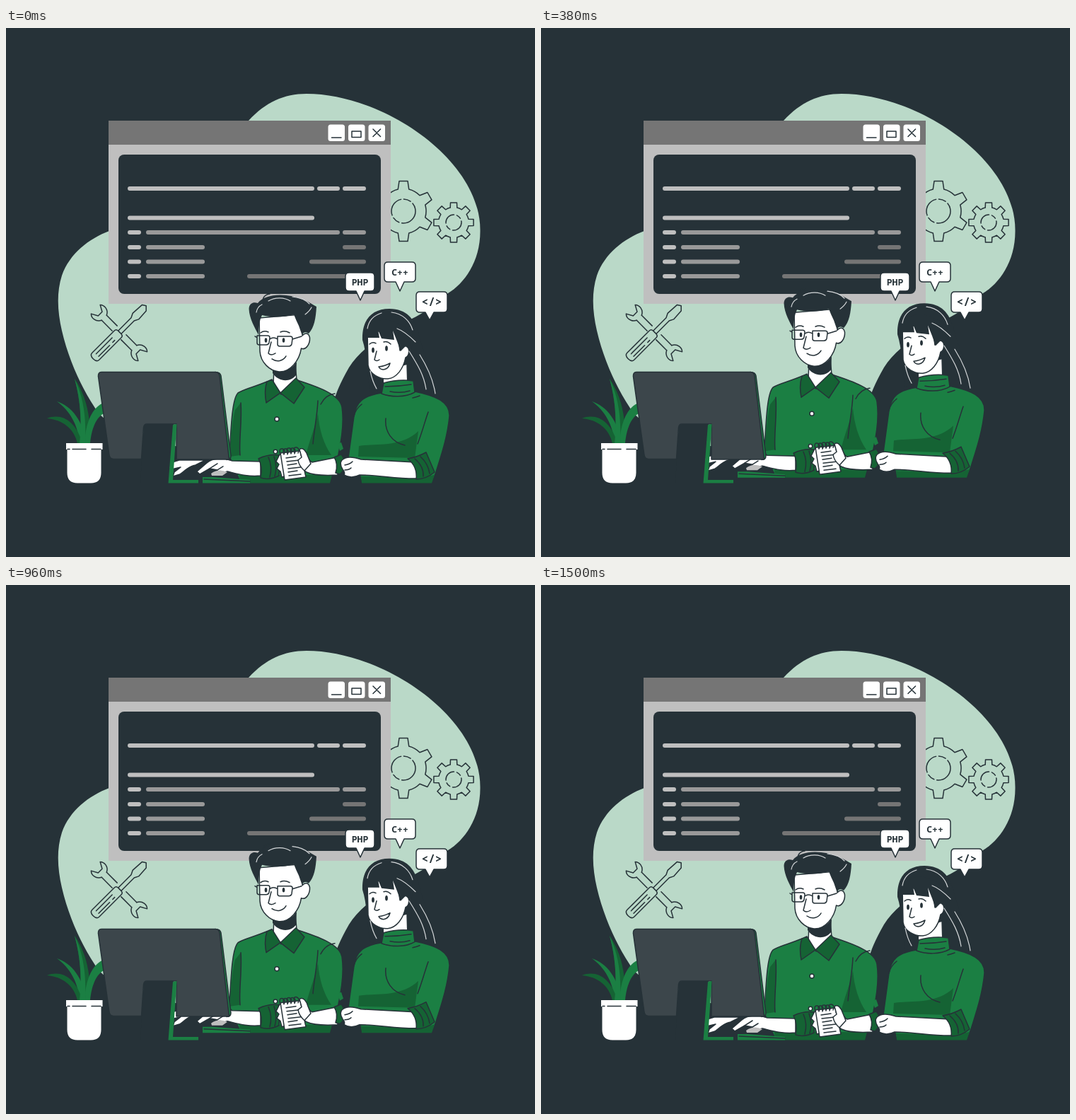
Write an HTML page that moves like this. It is 748x748 px and loops after 1540 ms.

```html
<!DOCTYPE html>
<html lang="en">
<head>
<meta charset="utf-8">
<title>Pair programming</title>
<style>
html, body { margin: 0; width: 100%; height: 100%; overflow: hidden; background: #263238; }
svg { display: block; width: 100vw; height: 100vh; }
.o { stroke: #263238; stroke-width: 1.5; stroke-linejoin: round; stroke-linecap: round; }
.l { fill: none; stroke: #263238; stroke-width: 1.5; stroke-linejoin: round; stroke-linecap: round; }
.h { fill: none; stroke: #d5d8da; stroke-width: 1.2; stroke-linecap: round; }
.w { fill: #fff; }
.g { fill: #1b7f43; }
.d { fill: #156334; }
.k { fill: #263238; }
.tag { font: 700 13px "Noto Sans Mono", "DejaVu Sans Mono", monospace; text-anchor: middle; fill: #263238; }
</style>
</head>
<body>
<svg viewBox="0 0 748 748">
  <rect width="748" height="748" class="k"/>
  <path fill="#bad9c8" d="M343 131C367 105 393 93 425 93C533 93 671 186 670.500 286C671 330 648 361 625 375C610 390 591 403 572 412C530 435 500 455 485 480C476 496 470 508 466 520L440 560C380 610 200 610 132 546C111 517 90 475 79 428C73 402 71 375 79 350C90 319 117 298 146 287L250 220Z"/>
  <g id="gears" class="l"></g>

  <g class="l">
    <g transform="translate(160 431) rotate(45)">
      <path d="M-30 -5H-9M9 -5H30M-30 5H-9M9 5H30"/>
      <path id="jaw" d="M30 -5C34 -13 43 -13 47 -9L38 -4V4L47 9C43 13 34 13 30 5"/>
      <use href="#jaw" transform="scale(-1 1)"/>
    </g>
    <g transform="translate(160 431) rotate(-45)">
      <path fill="#bad9c8" d="M1 -3H27L33 -6L51 -5L54 0L49 5L33 6L27 3H1Z"/>
      <path fill="#bad9c8" d="M-47 -7H-3Q1 -7 1 -3V3Q1 7 -3 7H-47Q-52 7 -52 0Q-52 -7 -47 -7ZM-44 -2H-12M-44 3H-22M-16 3H-12"/>
    </g>
  </g>

  <rect x="145" y="131" width="399" height="259" fill="#bfbfbf"/>
  <rect x="145" y="131" width="399" height="34" fill="#757575"/>
  <rect x="159" y="179" width="371" height="197" rx="8" class="k"/>
  <g class="w">
    <rect x="455.500" y="136.500" width="23.500" height="23.500" rx="3.500"/>
    <rect x="484" y="136.500" width="23.500" height="23.500" rx="3.500"/>
    <rect x="512.500" y="136.500" width="23.500" height="23.500" rx="3.500"/>
  </g>
  <path class="l" d="M460.500 155H474M489 146H502V154.500H489ZM519 143L529.500 153.500M529.500 143L519 153.500"/>
  <g id="code" stroke-width="6" stroke-linecap="round"></g>

  <g class="d">
    <path d="M97 496C113 519 121 551 118 587H104C108 552 104 522 97 496Z"/>
    <path d="M72 528C93 535 109 555 113 587H104C102 561 90 541 72 528Z" class="g"/>
    <path d="M58 552C79 544 99 556 108 587H101C96 566 80 554 58 552Z"/>
    <path d="M140 529C121 536 113 558 111 587H119C121 567 127 550 140 544Z" class="g"/>
    <path d="M97 496C108 518 114 548 112 587H104C108 552 104 522 97 496Z" class="g"/>
  </g>
  <path class="w" d="M85 587H136.500V596H134.500V629Q134.500 643.500 120 643.500H101Q86.500 643.500 86.500 629V596H85Z"/>
  <path class="l" d="M87 595.500H90M94 595.500H113M121 595.500H134"/>

  <g id="people">
    <!-- man -->
    <path class="g o" d="M369 500C350 508 335 511 328 516C319 525 318 570 316 606L332 643.500H458L470 603C475 580 478 556 475 536C472 518 440 507 412 498Z"/>
    <path class="d" d="M332 530C334 556 329 585 331 604L317 606C318 580 320 555 324 540ZM441 545C438 562 430 580 424 604H460C449 588 443 568 441 545ZM330 632H461L458 643.500H331Z"/>
    <path class="l" d="M332 530C334 556 329 585 331 604M441 527C440 549 436 566 434 588M445 532C449 524 456 518 465 517"/>
    <path class="w o" d="M379 480L378 503L389 518L411 498L409 474Z"/>
    <path class="k" d="M377 482C385 488 402 486 411 472L410 491C401 502 385 500 377 488Z"/>
    <path class="d o" d="M376 497L388 516L368 530C366 520 366 509 369 500ZM410 495L422 508L407 531L388 516Z"/>
    <circle cx="383" cy="553" r="3" class="w o"/>
    <circle cx="381" cy="599" r="2.700" class="w o"/>
    <path class="w o" d="M358 410L359 457C360 473 373 485 386 486C402 487 415 470 417.500 453C424 456 430 447 429.500 438C428 430 422 431 419 435L417 405Z"/>
    <path class="k" d="M357 434C352 424 344 411 343.500 397C344 389 350 387 356 389C363 380 379 376 396 378C416 380 429 388 439 394C438 411 436 423 428 432C424 429 420 430 418.500 434L414 421Q410 413 407 405C392 410 373 409 362 406Q357 416 357 434Z"/>
    <path class="l" d="M365 390C361 383 365 377 373 376"/>
    <path class="h" d="M371 386C381 380 394 381 402 386M405 380C416 381 424 385 429 390M354 402C355 396 358 393 362 391M423 405C427 402 430 399 432 395"/>
    <path class="l" d="M355 435H370Q373 435 373 438L372 445Q371 448 368 448H358Q355 448 355 445ZM384 436H402Q405 436 405 439L404 447Q403 450 400 450H387Q384 450 384 447ZM373 440Q378 436 384 440M405 440L418 436M355 438L352 436M360 431Q365 427 371 430M388 430Q394 427 401 431M375 444L371 460Q375 464 381 460M376 468C383 473 392 471 396 464"/>
    <ellipse cx="367.500" cy="441.500" rx="1.800" ry="3.200" class="k"/>
    <ellipse cx="392.500" cy="441.500" rx="1.800" ry="3.200" class="k"/>

    <path class="g" d="M278 635H292L345 639V643.500H278Z"/>
    <path class="l" d="M280 638L345 641"/>
    <path class="w o" d="M222 618L245 611H282L268 618C259 619 253 626 246 631L236 634L238 628L247 621L234 624Z"/>
    <path class="w o" d="M270 627L284 615C292 608 306 607 320 612L360 613V633C342 635 326 630 313 627L295 632L299 625L288 623L274 631Z"/>
    <path fill="#bfbfbf" d="M290 630Q300 622 313 628L306 633H291Z"/>
    <path class="l" d="M288 623L299 616M299 625L307 620"/>
    <path class="d o" d="M357 609Q371 602 387 604L386 633Q372 640 360 636Q363 620 357 609Z"/>
    <path class="l" d="M371 607Q377 620 373 635M379 606Q384 620 380 634"/>

    <path class="w o" d="M420 602C428 600 426 612 433 614L468 607L469 632C452 633 436 633 425 628L412 620Z"/>
    <path class="w o" d="M387 603L382 613L386 617L383 623L388 627L390 635L397 633V603Z"/>
    <path class="w o" d="M388 601L416 598L424 635L394 639Z"/>
    <path class="l" d="M396 608L410 606M397 613L415 611M398 618L411 616M399 623L417 621M399 628L412 626M400 633L417 631"/>
    <path class="l" d="M388 603q-3 -9 3 -8q5 2 2 8m0 0q-3 -9 3 -8q5 2 2 8m0 -1q-3 -9 3 -8q5 2 2 8m0 0q-3 -9 3 -8q5 2 2 8m0 -1q-3 -9 3 -8q5 2 2 8"/>
    <path class="w o" d="M415 596C420 592 425 599 427 606L431 616L422 626Q414 619 413 611L418 607Z"/>
    <path class="d o" d="M464 607L474 603C481 611 480 625 472 631L466 629Q470 617 464 607Z"/>
    <path class="g" d="M469 588L474 586L477 595L472 598Z"/>

    <!-- woman -->
    <path class="k" d="M504 441C503 413 517 397 542 397C567 397 577 412 583 430C586 450 604 483 607 518L571 525L515 515C510 490 511 462 504 441Z"/>
    <path class="w" d="M534 485V507H567V476Z"/>
    <path class="w o" d="M511 430L512 477C514 490 529 497 540 496C552 495 562 482 565 466C570 464 572 453 566 450C561 449 558 453 557 456L553 427Z"/>
    <path class="k" d="M505 442C505 425 516 412 540 412L575 426L574 451C568 446 561 449 558 457L553 443L547 428L549 441L531 439L526 427L528 438L511 438L509 451Z"/>
    <path class="k" d="M555 432L571 442C577 460 575 482 567 500L566 467Q574 455 566 449L558 457Z"/>
    <path class="h" d="M511 425C513 413 521 406 531 403M545 402C561 404 571 414 575 427M553 425Q564 429 579 444M570 457C582 476 591 491 594 511M585 462C597 481 604 497 607 517M515 485Q518 500 524 510"/>
    <path class="l" d="M514 447Q518 443 523 446M534 444Q539 442 544 447M524 457L521 469Q524 472 528 469"/>
    <ellipse cx="519" cy="455.500" rx="1.900" ry="3.800" class="k"/>
    <ellipse cx="538" cy="453" rx="1.900" ry="3.800" class="k"/>
    <path class="w o" d="M527 479Q536 478 543 474Q541 482 534 483Q529 483 527 479Z"/>

    <path class="g o" d="M531 516C505 520 495 529 492 549L484 608L501 634L503 643.500H602L608 628C615 605 624 580 627 549C628 529 608 520 578 514Z"/>
    <path class="d" d="M499 591C520 587 558 594 583 570L578 608L498 606ZM502 634L580 636L606 632L602 643.500H503Z"/>
    <path class="g o" d="M534 502C548 498 562 497 576 499L578 515C564 523 544 522 531 517Z"/>
    <path class="l" d="M536 507Q555 507 573 504M543 514Q558 517 571 513M492 549Q494 539 503 532M537 552C535 571 546 586 564 590M597 543C592 557 588 573 582 588M575 523Q580 522 585 520"/>
    <path class="w o" d="M475 611C481 605 493 607 502 610L578 614L583 637C555 638 526 632 500 632Q488 638 478 632Q480 628 476 624Q471 616 475 611Z"/>
    <path class="l" d="M479 618Q486 617 490 613M479 625Q485 625 488 622"/>
    <path class="d o" d="M568 609Q581 607 594 600L606 628Q594 638 580 638Q582 620 568 609Z"/>
    <path class="l" d="M578 609Q591 620 590 634M586 606Q597 616 599 630"/>
  </g>

  <path class="g o" d="M296 486.500Q303 486.500 304 492L318 605Q318 610.500 312 610.500Z"/>
  <path fill="#3c464b" class="o" d="M135 486.500H296Q301 486.500 302 492L315.500 610H241V560H199Q195 560 194.500 565L191.500 609.500H152Q147 609.500 146 604L130.500 493Q130 486.500 135 486.500Z"/>
  <path class="k" d="M199 560H237L230 643.500H190L194.500 565Q195 560 199 560Z"/>
  <path class="g" d="M236 561L241.500 560L236 639H272V643.500H229.500Z"/>

  <g class="w o">
    <path d="M485 346H516Q521 346 521 351V367Q521 372 516 372H507L501 385L495 372H485Q480 372 480 367V351Q480 346 485 346Z"/>
    <path d="M540 331H574Q579 331 579 336V354Q579 359 574 359H563L557 372L551 359H540Q535 359 535 354V336Q535 331 540 331Z"/>
    <path d="M585 373H619Q624 373 624 378V397Q624 402 619 402H605L599 413L593 402H585Q580 402 580 397V378Q580 373 585 373Z"/>
  </g>
  <text class="tag" x="500.500" y="364">PHP</text>
  <text class="tag" x="557" y="349.500">C++</text>
  <text class="tag" x="602" y="393" style="font-size:16px">&lt;/&gt;</text>
</svg>
<script>
const $ = id => document.getElementById(id);

// rows of bars: y, colour, then start/end pairs
const bars = [
  [227, '#bfbfbf', 172, 436, 440, 472, 476, 509],
  [268.5, '#bfbfbf', 172, 436],
  [289, '#bfbfbf', 172, 191], [289, '#999', 198, 472, 476, 509],
  [310, '#bfbfbf', 172, 191], [310, '#999', 198, 281], [310, '#757575', 476, 509],
  [330.5, '#bfbfbf', 172, 191], [330.5, '#999', 198, 281], [330.5, '#757575', 429, 509],
  [351, '#bfbfbf', 172, 191], [351, '#999', 198, 281], [351, '#757575', 341, 509]
];
$('code').innerHTML = bars.map(([y, color, ...x]) => {
  let d = '';
  for (let i = 0; i < x.length; i += 2) d += `M${x[i] + 3} ${y}H${x[i + 1] - 3}`;
  return `<path stroke="${color}" d="${d}"/>`;
}).join('');

function gear(cx, cy, teeth, body, outer, start, foot, tip, hole) {
  const at = (r, deg) => {
    const a = deg * Math.PI / 180;
    return (cx + r * Math.cos(a)).toFixed(1) + ' ' + (cy + r * Math.sin(a)).toFixed(1);
  };
  let d = '';
  for (let i = 0; i < teeth; i++) {
    const a = start + i * 360 / teeth;
    d += (i ? `A${body} ${body} 0 0 1 ` : 'M') + at(body, a - foot) +
      'L' + at(outer, a - tip) + 'L' + at(outer, a + tip) + 'L' + at(body, a + foot);
  }
  d += `A${body} ${body} 0 0 1 ${at(body, start - foot)}Z`;
  return `<path d="${d}"/>` +
    `<circle cx="${cx}" cy="${cy}" r="${hole}" stroke-dasharray="${hole * 1.7} 4 ${hole * .6} 4"/>`;
}
$('gears').innerHTML =
  gear(562, 259, 6, 32, 43, -90, 14, 8, 17) +
  gear(633, 275, 8, 21.5, 28.5, 0, 13, 9, 11);

// steady lift, then steady return and a short rest
const LOOP = 1540, RISE = 725, BACK = 1500, LIFT = 14.8;
function draw(now) {
  const t = now % LOOP;
  const part = t < RISE ? t / RISE : Math.max(0, (BACK - t) / (BACK - RISE));
  $('people').setAttribute('transform', `translate(0 ${(-LIFT * part).toFixed(2)})`);
}
const begin = performance.now();
function tick() {
  draw(performance.now() - begin);
  requestAnimationFrame(tick);
}
tick();
</script>
</body>
</html>
```
